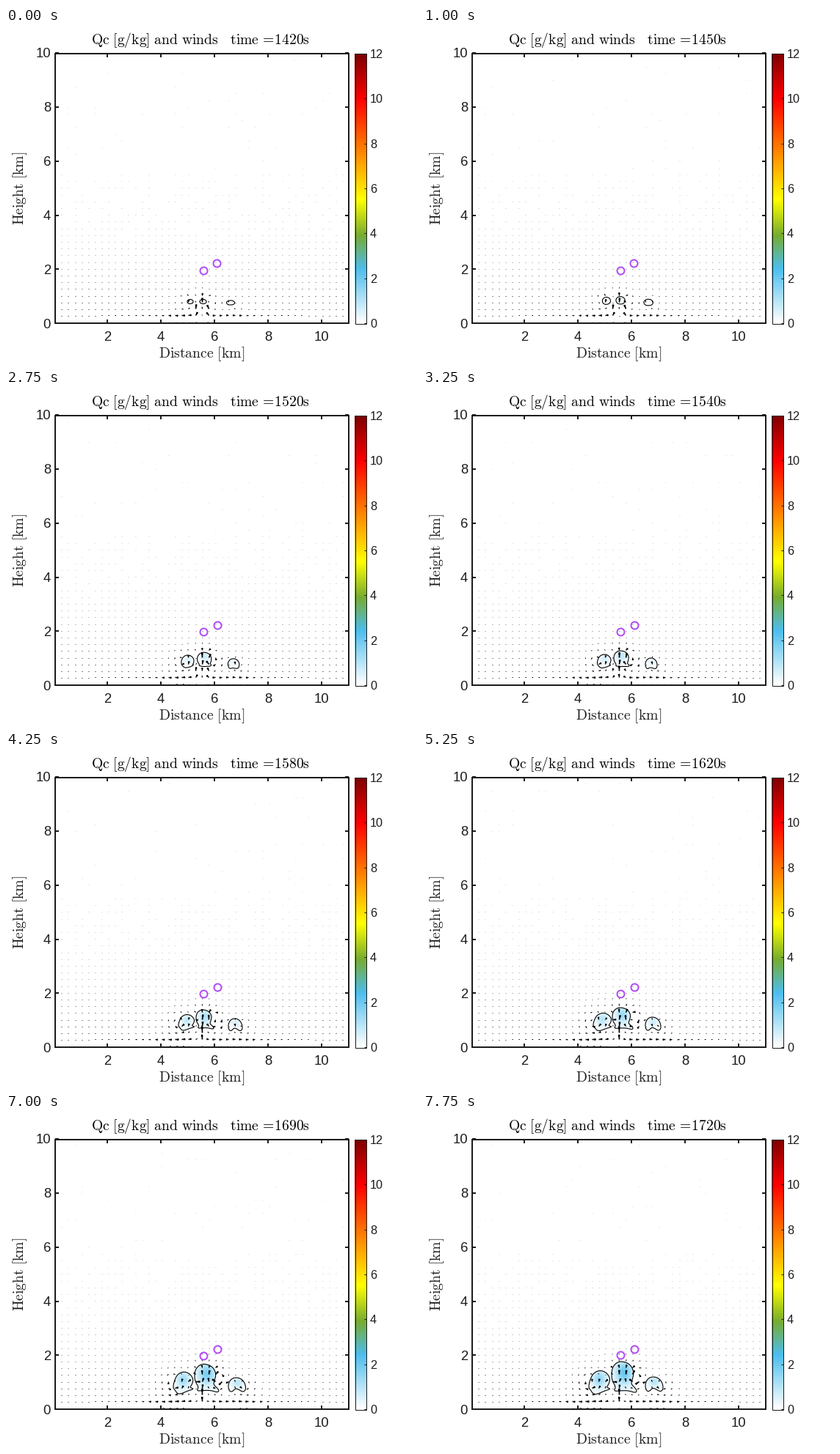
A matplotlib script that plays this animation: 560 by 456 pixels, repeating every 8000 ms.

```python
import numpy as np
import matplotlib.pyplot as plt
from matplotlib.animation import FuncAnimation
from matplotlib.collections import LineCollection
from matplotlib.colors import LinearSegmentedColormap
from matplotlib.path import Path
from matplotlib.patches import PathPatch, Rectangle

W, H, DPI = 560, 456, 64
PT = 72 / DPI  # points per pixel
FRAMES, INTERVAL = 32, 250
LEFT, RIGHT, TOP, GROUND = 67, 467, 35, 403
INK = "#1c1c1c"

plt.rcParams["font.family"] = "Liberation Sans"
plt.rcParams["mathtext.fontset"] = "cm"

fig = plt.figure(figsize=(W / DPI, H / DPI), dpi=DPI, facecolor="white")
ax = fig.add_axes([0, 0, 1, 1])
ax.set_xlim(0, W)
ax.set_ylim(H, 0)
ax.axis("off")

CMAP = LinearSegmentedColormap.from_list("qc", [
    (0, "white"), (2.4 / 12, "#4dbeee"), (3.9 / 12, "#77ac30"),
    (5.5 / 12, "yellow"), (10 / 12, "red"), (1, "#800000")], N=256)

# Cloud boxes (left, right, top, bottom) at the key times, and mature outlines.
TIMES = [1420, 1490, 1540, 1580, 1620, 1660, 1720]
CLOUDS = [
    dict(strength=0.72, box=[
        (247, 255, 370.5, 376.5), (241, 256, 363.5, 378.5), (237.5, 256, 361, 379.5),
        (235, 256.5, 358.5, 380), (232, 256.5, 356.5, 380.5), (230, 255, 354, 381.5),
        (226, 254.5, 350.5, 382.5)],
        shape=[(240, 350), (248, 353), (253, 361), (251, 369), (248, 373), (254, 375),
               (245, 378), (237, 382), (232, 382), (229, 377), (226, 373), (228, 363),
               (232, 354)]),
    dict(strength=1.0, box=[
        (264, 273, 370.5, 376.5), (261.5, 278, 361.5, 377.5), (260, 281, 356, 377.5),
        (259, 283, 352, 378), (258, 286, 349, 378.5), (257, 288.5, 345, 379),
        (257, 291, 338, 380)],
        shape=[(272, 338), (282, 342), (287, 352), (285, 362), (283, 368), (288, 373),
               (291, 377), (289, 380), (280, 377), (270, 377), (260, 378), (263, 372),
               (258, 364), (257, 354), (259, 345), (265, 339)]),
    dict(strength=0.5, box=[
        (300.5, 311.5, 372, 378), (301.5, 316, 368, 380), (303, 319, 366, 380.5),
        (303, 322, 364, 380.5), (303, 324, 362, 380), (303, 326, 361, 379.5),
        (303, 327, 359, 378.5)],
        shape=[(314, 359), (321, 361), (326, 367), (327, 375), (323, 378), (318, 375),
               (313, 373), (308, 378), (304, 376), (303, 368), (307, 361)]),
]

cols, rows = np.meshgrid(np.arange(1, 44), np.arange(0, 40))
GX = np.floor(66.7 + 9.11 * cols.ravel()) + 0.5
GY = np.floor(402 - 9.21 * rows.ravel()) + 0.5
GH = GROUND - GY
PHASE = np.random.default_rng(4).random(GX.size)


def text(x, y, s, size, **kw):
    return ax.text(x, y, s, fontsize=size * PT, va=kw.pop("va", "baseline"), **kw)


def latex(s):
    return r"$\mathrm{" + s.replace(" ", r"\ ").replace("=", r"\!=\!") + "}$"


def line(xs, ys, width, color=INK, z=6):
    ax.plot(xs, ys, color=color, lw=width * PT, solid_capstyle="butt", zorder=z)


def draw_axes():
    ax.add_patch(Rectangle((LEFT, TOP), RIGHT - LEFT, GROUND - TOP, fill=False,
                           ec=INK, lw=2 * PT, zorder=6))
    for v in range(2, 11, 2):
        x = round(65.6 + 36.45 * v)
        line([x, x], [GROUND, GROUND - 5], 2)
        line([x, x], [TOP, TOP + 5], 2)
        text(x, 427, str(v), 18.5, ha="center", color=INK)
    for v in range(0, 11, 2):
        y = round(GROUND - 36.85 * v)
        line([LEFT, LEFT + 5], [y, y], 2)
        line([RIGHT, RIGHT - 5], [y, y], 2)
        text(61, y + 6.5, str(v), 18.5, ha="right", color=INK)
    text(267, 450, latex("Distance [km]"), 19.7, ha="center", color=INK)
    text(31, 218.5, latex("Height [km]"), 19.7, ha="right", va="center",
         rotation=90, color=INK)


def draw_colorbar():
    ax.imshow(np.linspace(12, 0, 256)[:, None], extent=(475, 491, GROUND, TOP),
              cmap=CMAP, vmin=0, vmax=12, aspect="auto", zorder=1)
    ax.add_patch(Rectangle((475.5, TOP - 0.5), 15, GROUND - TOP + 1, fill=False,
                           ec=INK, lw=PT, zorder=6))
    for v in range(0, 13, 2):
        y = GROUND - (GROUND - TOP) * v / 12
        line([488, 491], [y, y], 1)
        text(496, y + 6, str(v), 16.3, color=INK)


def smooth(points):
    """Closed corner cutting."""
    for _ in range(3):
        nxt = np.roll(points, -1, axis=0)
        points = np.stack([0.75 * points + 0.25 * nxt,
                           0.25 * points + 0.75 * nxt], 1).reshape(-1, 2)
    return points


def unit_box(points):
    return (points - points.min(0)) / np.ptp(points, axis=0)


def cloud_box(cloud, t):
    return [np.interp(t, TIMES, col) for col in zip(*cloud["box"])]


def cloud_path(cloud, t):
    """Grow from an ellipse into the mushroom outline."""
    grown = unit_box(np.array(cloud["shape"], float))
    rel = grown - 0.5
    young = 0.5 + 0.5 * rel / np.hypot(*rel.T)[:, None]
    w = np.interp(t, [1480, 1580], [0, 1])
    l, r, top, bottom = cloud_box(cloud, t)
    pts = unit_box(smooth(young * (1 - w) + grown * w))
    pts = pts * [r - l, bottom - top] + [l, top]
    return Path(np.vstack([pts, pts[:1]]), closed=True)


def wind(t):
    """Vortex pairs mirrored at the ground, a stem updraft and low inflow."""
    u, v = np.zeros_like(GX), np.zeros_like(GX)
    for cloud in CLOUDS:
        l, r, top, bottom = cloud_box(cloud, t)
        cx, d = (l + r) / 2, max(6, (r - l) / 2 - 1)
        ch = GROUND - (top + bottom) / 2
        gamma = 62 * cloud["strength"] * np.interp(t, [1420, 1500, 1720], [0.75, 0.95, 1.1])
        for side in (-1, 1):
            for mirror in (1, -1):
                dx, dh = GX - cx - side * d, GH - mirror * ch
                k = -side * mirror * gamma / (dx ** 2 + dh ** 2 + 40)
                u -= k * dh
                v += k * dx
    spread = np.interp(t, [1490, 1580], [9, 0])
    for sx in (267 - spread, 267 + spread):
        power = 5 if spread else 4
        v += power * np.exp(-((GX - sx) / 5) ** 2 - ((GH - 17) / 12) ** 2)
    dx = 267 - GX
    u += (4.6 * np.tanh(dx / 14) * np.exp(-np.abs(dx) / 120)
          * np.exp(-((GH - 7) / 8) ** 2))
    speed = np.hypot(u, v) + 1e-9
    limit = np.minimum(1, 14 / speed)
    return u * limit, v * limit


def draw_wind(t):
    u, v = wind(t)
    size = np.hypot(u, v)
    step = (t - 1420) / 10
    share = np.interp(GH, [112, 135, 200, 215, 350], [1, 0.55, 0.3, 0.07, 0.02])
    share = share * (1 + 0.02 * step * (GH > 125))
    seen = ((PHASE + 0.006 * step) % 1 < share) | (size > 1.2)
    tone = np.interp(GH, [0, 35, 60, 85, 125, 200, 350],
                     [0, 0.1, 0.35, 0.55, 0.74, 0.82, 0.86])
    base = np.stack([GX, GY], 1)
    flow = np.stack([u, -v], 1)

    dots = seen & (size <= 1.2)
    half = np.array([0.5, 0])
    speck = LineCollection(np.stack([base - half, base + half], 1)[dots], linewidths=PT,
                           colors=[(g, g, g) for g in tone[dots]], zorder=3)

    long = size > 1.2
    width = np.clip(0.8 + 0.16 * size[long], 1, 1.7)
    dark = np.clip(tone[long] - 0.12 * (size[long] - 1), 0, 1)
    shafts = LineCollection(np.stack([base, base + flow], 1)[long], linewidths=width * PT,
                            colors=[(g, g, g) for g in dark], zorder=3)

    big = size > 3
    tip = (base + flow)[big]
    back = tip - flow[big] / size[big, None] * np.minimum(4, 0.45 * size[big])[:, None]
    heads = LineCollection(np.stack([back, tip], 1), linewidths=2.5 * PT,
                           colors="black", zorder=3)
    return [ax.add_collection(c, autolim=False) for c in (speck, shafts, heads)]


def draw_cloud(cloud, t):
    path = cloud_path(cloud, t)
    l, r, top, bottom = cloud_box(cloud, t)
    x, y = np.meshgrid(np.linspace(-1, 1, 40), np.linspace(0, 1, 40))
    peak = cloud["strength"] * np.interp(t, [1420, 1490, 1540, 1620, 1720],
                                         [0.1, 0.45, 0.85, 1.35, 2.0])
    qc = peak * (0.12 + 0.9 * np.exp(-(x / 0.65) ** 2 - ((y - 0.36) / 0.36) ** 2))
    fill = ax.imshow(qc, extent=(l, r, bottom, top), cmap=CMAP, vmin=0, vmax=12,
                     aspect="auto", interpolation="bilinear", zorder=1)
    fill.set_clip_path(path, ax.transData)
    edge = ax.add_patch(PathPatch(path, fill=False, ec="black", lw=1.1 * PT, zorder=2))
    return [fill, edge]


draw_axes()
draw_colorbar()
title = text(116, 22, "", 19.6, color="black")
markers, = ax.plot([], [], "o", ms=10 * PT, mfc="none", mec="#b04cf5",
                   mew=2 * PT, zorder=5)
live = []


def update(frame):
    t = 1420 + 10 * max(0, frame - 1)
    while live:
        live.pop().remove()
    for cloud in CLOUDS:
        live.extend(draw_cloud(cloud, t))
    live.extend(draw_wind(t))
    title.set_text(latex(f"Qc [g/kg] and winds   time ={t}s"))
    late = t >= 1520
    markers.set_data([268.5, 286.5 + late], [330.5 - late - (t >= 1700), 320.5])
    return [title, markers, *live]


anim = FuncAnimation(fig, update, frames=FRAMES, interval=INTERVAL,
                     init_func=lambda: update(0), repeat=True, repeat_delay=0, blit=False)
plt.show()
```
